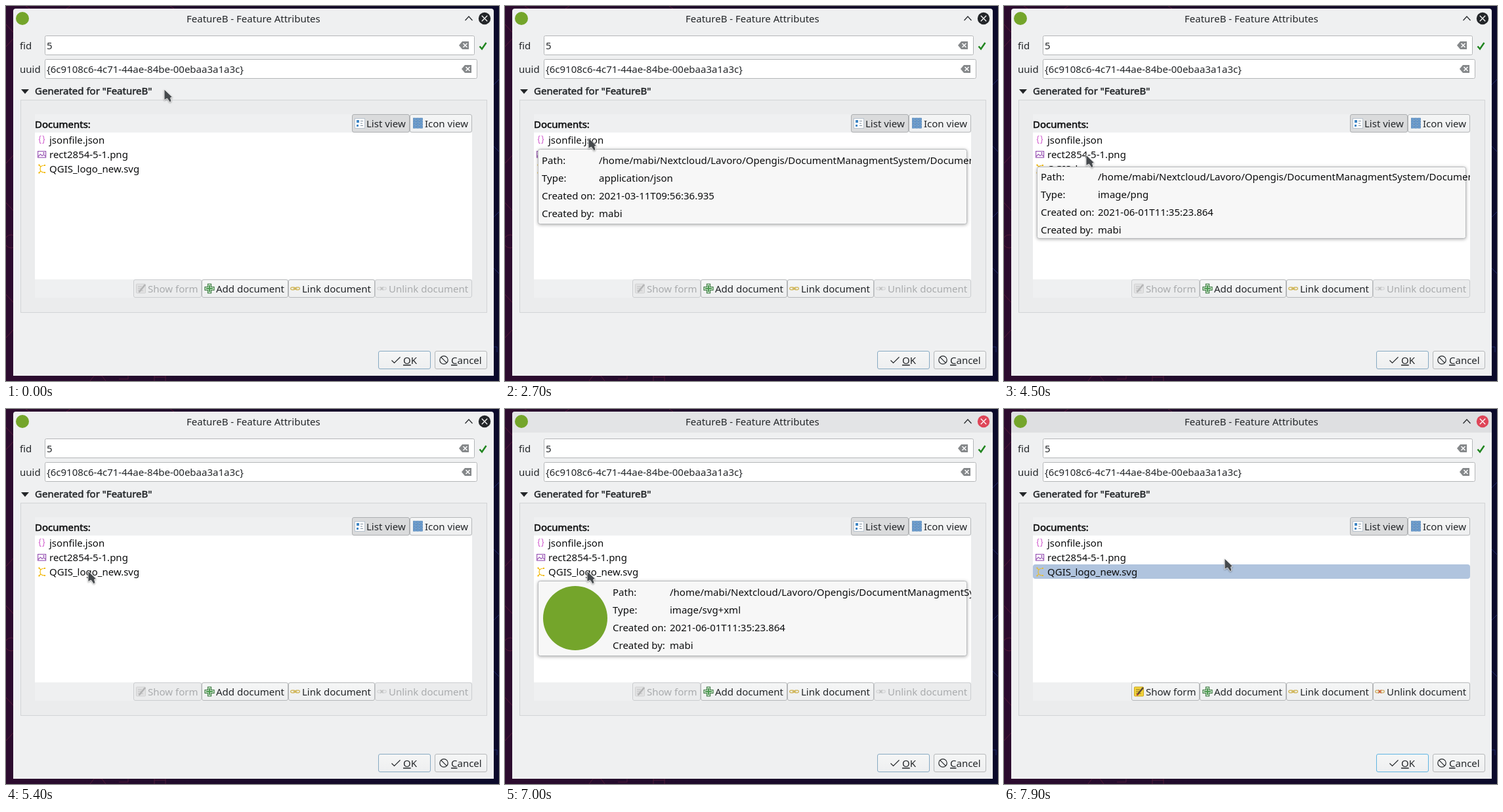
Recreate the animation shown at these times as an HTML page. Size 751 by 572 pixels, loop 8 s.

```html
<!DOCTYPE html>
<html lang="en">
<head>
<meta charset="utf-8">
<title>Feature Attributes</title>
<style>
  html, body { margin: 0; width: 100%; height: 100%; overflow: hidden; background: #1b0c2b; }
  svg { display: block; width: 751px; height: 572px; }
  text { font: 15px "Noto Sans", "Open Sans", sans-serif; fill: #0c0d0e; white-space: pre; }
  .bold { stroke: #0c0d0e; stroke-width: .5px; }
  .ui { fill: #232629; }
  .ui.bold { stroke: #232629; }
  .field { fill: #fff; stroke: #b4b6b8; }
  .btn { fill: url(#face); stroke: #b5b7b9; }
  .line { fill: none; stroke: #232629; }
  .off text { fill: #a9abad; }
  .off .btn { fill: #ebeced; stroke: #cbcdcf; }
  .off .icon { filter: grayscale(1); opacity: .35; }
  .tip-box { fill: #f7f7f7; stroke: #b9bbbd; filter: drop-shadow(0 1.5px 2.5px rgba(0,0,0,.32)); }
</style>
</head>
<body>
<svg viewBox="0 0 751 572" xmlns="http://www.w3.org/2000/svg">
  <defs>
    <linearGradient id="wall">
      <stop offset="0" stop-color="#2d0c2f"/>
      <stop offset=".5" stop-color="#1c0b2b"/>
      <stop offset="1" stop-color="#0b0a2b"/>
    </linearGradient>
    <linearGradient id="face" x2="0" y2="1">
      <stop offset="0" stop-color="#f5f6f6"/>
      <stop offset="1" stop-color="#eeeff0"/>
    </linearGradient>
    <clipPath id="list"><rect x="44" y="193" width="666" height="224"/></clipPath>
    <g id="clear">
      <path d="M0 6 5 0H15V12H5Z" fill="#85888a"/>
      <path d="M6.5 3 12.5 9M12.5 3 6.5 9" stroke="#fff" stroke-width="1.5"/>
    </g>
    <g id="chain" fill="none" stroke-width="1.3">
      <rect x=".7" y="6.2" width="6.6" height="3.6" rx="1.8"/>
      <rect x="7.7" y="6.2" width="6.6" height="3.6" rx="1.8"/>
      <path d="M4.5 8h6"/>
    </g>
  </defs>

  <!-- desktop -->
  <rect width="751" height="572" fill="url(#wall)"/>
  <g fill="none" stroke="#6b2340" opacity=".65">
    <path d="M0 28 11 40M0 62 11 50M0 240 11 228M0 300 11 312M0 440 11 452M0 506 11 494"/>
    <circle cx="8" cy="359" r="10"/>
    <path d="M30 0 36 4M92 4 98 0M250 0 256 4M128 572l6-8h12l6 8M172 569h14v-5M226 564v8M243 564v8M226 566h17"/>
  </g>
  <path d="M743 120 751 112M743 214 751 222M743 322 751 314M743 400 751 408M743 520h5v8" fill="none" stroke="#1f2a6a"/>

  <!-- window -->
  <path d="M11 564V8q0-4 4-4H739q4 0 4 4V564Z" fill="#eff0f1"/>
  <path id="shade" d="M11 36V8q0-4 4-4H739q4 0 4 4V36Z" fill="#dedfe1"/>
  <circle cx="25" cy="19" r="10" fill="#74a52b"/>
  <text class="ui" x="275" y="25">FeatureB - Feature Attributes</text>
  <path class="line" d="M699.500 22 705 16 710.500 22" stroke-width="1.2"/>
  <circle id="close" cx="729" cy="19" r="9.200"/>
  <path d="M724.800 14.800l8.400 8.400M733.200 14.800l-8.400 8.400" stroke="#fff" stroke-width="1.3"/>

  <text class="ui" x="21" y="66">fid</text>
  <rect class="field" x="59.500" y="45.500" width="654" height="29" rx="2"/>
  <text class="ui" x="62" y="66">5</text>
  <use href="#clear" x="690" y="54"/>
  <path d="M721.500 61.500 725 65.500 731.500 56" fill="none" stroke="#20851f" stroke-width="2.500"/>

  <text class="ui" x="21" y="102">uuid</text>
  <rect class="field" x="59.500" y="81.500" width="658" height="29" rx="2"/>
  <text class="ui" x="62" y="102">{6c9108c6-4c71-44ae-84be-00ebaa3a1a3c}</text>
  <use href="#clear" x="694" y="90"/>

  <path d="M23 127H35L29 134Z" fill="#232629"/>
  <text class="ui bold" x="44" y="135">Generated for "FeatureB"</text>
  <rect x="22.500" y="143.500" width="710" height="324" fill="#ebeced" stroke="#d2d4d6"/>
  <rect x="44" y="165" width="666" height="280" fill="#eff0f1"/>
  <text class="bold" x="44" y="186">Documents:</text>

  <g id="buttons"></g>

  <!-- document list -->
  <rect x="44" y="193" width="666" height="224" fill="#fff"/>
  <rect id="pick" x="44" y="237" width="666" height="22" rx="4" fill="#b0c4de"/>
  <g fill="none" stroke="#d364d0" stroke-width="1.100">
    <path d="M53.500 198q-2 0-2 2v2q0 1.500-1.500 1.800 1.500.3 1.500 1.800v2q0 2 2 2M55.500 198q2 0 2 2v2q0 1.500 1.500 1.800-1.500.3-1.500 1.800v2q0 2-2 2"/>
  </g>
  <g fill="none" stroke="#9b59b6" stroke-width="1.200">
    <rect x="48.600" y="221.600" width="12" height="9.500"/>
    <path d="M49 229.500 52.500 226 55 228.500 57.500 226.500 60.500 229.500"/>
    <circle cx="57.500" cy="224.300" r=".6"/>
  </g>
  <g id="vec" stroke="#f2b90c" fill="none" stroke-width="1.200">
    <path d="M59 243q-7 0-7 5.500T59 254M50 242.500 53.500 245.500M50 254.500 53.500 251.500"/>
    <path d="M49.500 241.500h2v2h-2zM49.500 253.500h2v2h-2zM58 242h2v2h-2zM58 253h2v2h-2z" fill="#f2b90c" stroke="none"/>
  </g>
  <text x="66" y="210">jsonfile.json</text>
  <text x="66" y="232">rect2854-5-1.png</text>
  <text x="66" y="254">QGIS_logo_new.svg</text>

  <!-- dialog buttons -->
  <rect id="ok" class="btn" x="567.500" y="526.500" width="79" height="27" rx="2.500"/>
  <path class="line" d="M587.500 540.500 591.500 544.500 600.500 535.500" stroke-width="1.200"/>
  <text class="ui" x="605" y="546"><tspan text-decoration="underline">O</tspan>K</text>
  <rect class="btn" x="653.500" y="526.500" width="79" height="27" rx="2.500"/>
  <circle class="line" cx="667" cy="540" r="6.200" stroke-width="1.200"/>
  <path class="line" d="M662.700 535.700l8.600 8.600" stroke-width="1.200"/>
  <text class="ui" x="678" y="546"><tspan text-decoration="underline">C</tspan>ancel</text>

  <g id="tips"></g>

  <path id="cursor" d="M0 0V16.500L4.500 14 8.500 19.800 11 18 9.500 13 12.500 12Z" fill="#464a4d"
    stroke="#f4f4f4" stroke-width=".9" stroke-linejoin="round" style="filter:drop-shadow(.5px 1px 1px rgba(0,0,0,.35))"/>
</svg>
<script>
const $ = id => document.getElementById(id);

const icons = {
  list: `<rect x=".5" y=".5" width="15" height="15" fill="#fff" stroke="#b9c4cf"/>
    <path d="M3 3h4v4H3zM3 10h3v3H3z" fill="#3f86c4"/><path d="M9 4.500h4M9 8h3M9 11.500h4" stroke="#7f8f9d"/>`,
  grid: [0, 1, 2, 3].map(r => [0, 1, 2].map(c =>
    `<rect x="${c * 5 + .5}" y="${r * 4}" width="4" height="3.200" fill="#6f9fd0" stroke="#3b74ad" stroke-width=".6"/>`).join("")).join(""),
  form: `<rect x=".5" y="1" width="14" height="14" rx="1" fill="#f3d33c" stroke="#c9a61c"/>
    <path d="M3 5h6M3 8h5M3 11h8" stroke="#8a7420"/>
    <path d="M5 13 14 2" stroke="#5b4a36" stroke-width="2.600"/><path d="M4.500 14 6 11.500" stroke="#c33" stroke-width="1.500"/>`,
  add: `<path d="M5.500 1h5v4.500H15v5h-4.500V15h-5v-4.500H1v-5h4.500Z" fill="#cfe6cf" stroke="#3d7a42" stroke-width="1.200"/>
    <path d="M8 3v10M3 8h10" stroke="#4d9a52" stroke-width="2"/>`,
  link: `<use href="#chain" stroke="#cdb04a"/>`,
  unlink: `<use href="#chain" stroke="#cdaa5a"/><path d="M5.500 5.500l4 5M9.500 5.500l-4 5" stroke="#cf3a2c" stroke-width="1.200"/>`
};

// id, left, right, top, text x, icon, label
const buttons = [
  ["lv", 527, 615, 165, 549, "list", "List view"],
  ["iv", 615, 710, 165, 638, "grid", "Icon view"],
  ["show", 194, 298, 417, 216, "form", "Show form"],
  ["add", 298, 430, 417, 320, "add", "Add document"],
  ["lnk", 430, 562, 417, 451, "link", "Link document"],
  ["unl", 562, 710, 417, 583, "unlink", "Unlink document"]
];
$("buttons").innerHTML = buttons.map(([id, l, r, y, x, icon, label]) => `<g id="${id}">
  <rect class="btn" x="${l + .5}" y="${y + .5}" width="${r - l - 1}" height="27" rx="2.500"/>
  <g class="icon" transform="translate(${x - 18} ${y + 6})">${icons[icon]}</g>
  <text class="ui" x="${x}" y="${y + 20}">${label}</text></g>`).join("");
$("lv").querySelector(".btn").style.cssText = "fill:#dadbdc;stroke:#adafb1";

const user = "mabi";
const path = `/home/${user}/Nextcloud/Lavoro/Opengis/DocumentManagmentSystem/Documents`;
const labels = ["Path:", "Type:", "Created on:", "Created by:"];

function tip(top, height, x, base, type, made, art = "") {
  const rows = [path, type, made, user].map((v, i) => {
    const y = top + base + i * 27;
    return `<text x="${x}" y="${y}">${labels[i]}</text><text x="${x + 87}" y="${y}">${v}</text>`;
  }).join("");
  return `<g><rect class="tip-box" x="50.500" y="${top + .5}" width="653" height="${height - 1}" rx="3"/>
    ${art}<g clip-path="url(#list)">${rows}</g></g>`;
}
$("tips").innerHTML =
  tip(218, 115, 56, 23, "application/json", "2021-03-11T09:56:36.935") +
  tip(245, 110, 56, 21, "image/png", "2021-06-01T11:35:23.864") +
  tip(262, 115, 164, 23, "image/svg+xml", "2021-06-01T11:35:23.864",
    `<circle cx="107" cy="319" r="49" fill="#74a52b"/>`);
const tips = [...$("tips").children];

// time, cursor x, cursor y, tip index, tip opacity
const steps = [
  [0, 241, 127], [900, 236, 131], [1000, 218, 144], [1100, 190, 163], [1200, 160, 184],
  [1300, 140, 199], [1400, 130, 206], [1500, 128, 204], [1600, 127, 201],
  [2700, 127, 201, 0, 1], [3200, 127, 206, 0, .7], [3300, 128, 212, 0, .25], [3400, 128, 217],
  [3800, 123, 222], [3900, 125, 227],
  [4500, 125, 227, 1, 1], [4900, 125, 238, 1, .4], [5000, 125, 245],
  [5300, 125, 246], [5400, 125, 247],
  [6000, 125, 247, 2, 1], [7800, 250, 236, 2, .4], [7900, 336, 228]
];

function draw(t) {
  const [, x, y, index, alpha] = steps.findLast(s => s[0] <= t);
  $("cursor").setAttribute("transform", `translate(${x} ${y})`);
  tips.forEach((g, i) => {
    g.style.display = i === index ? "" : "none";
    g.style.opacity = alpha ?? 0;
  });

  const picked = t >= 7100;
  $("shade").style.opacity = t < 7000 ? 0 : t < 7100 ? .65 : t < 7200 ? .9 : 1;
  $("close").style.fill = t < 7000 ? "#232629" : "#de4558";
  $("pick").style.display = picked ? "" : "none";
  $("vec").style.opacity = picked ? .8 : 1;
  $("ok").style.stroke = picked ? "#5fb4e2" : "#86a9c2";
  for (const id of ["show", "unl"]) $(id).classList.toggle("off", !picked);
}

function tick() {
  draw(performance.now() % 8000);
  requestAnimationFrame(tick);
}
tick();
</script>
</body>
</html>
```
